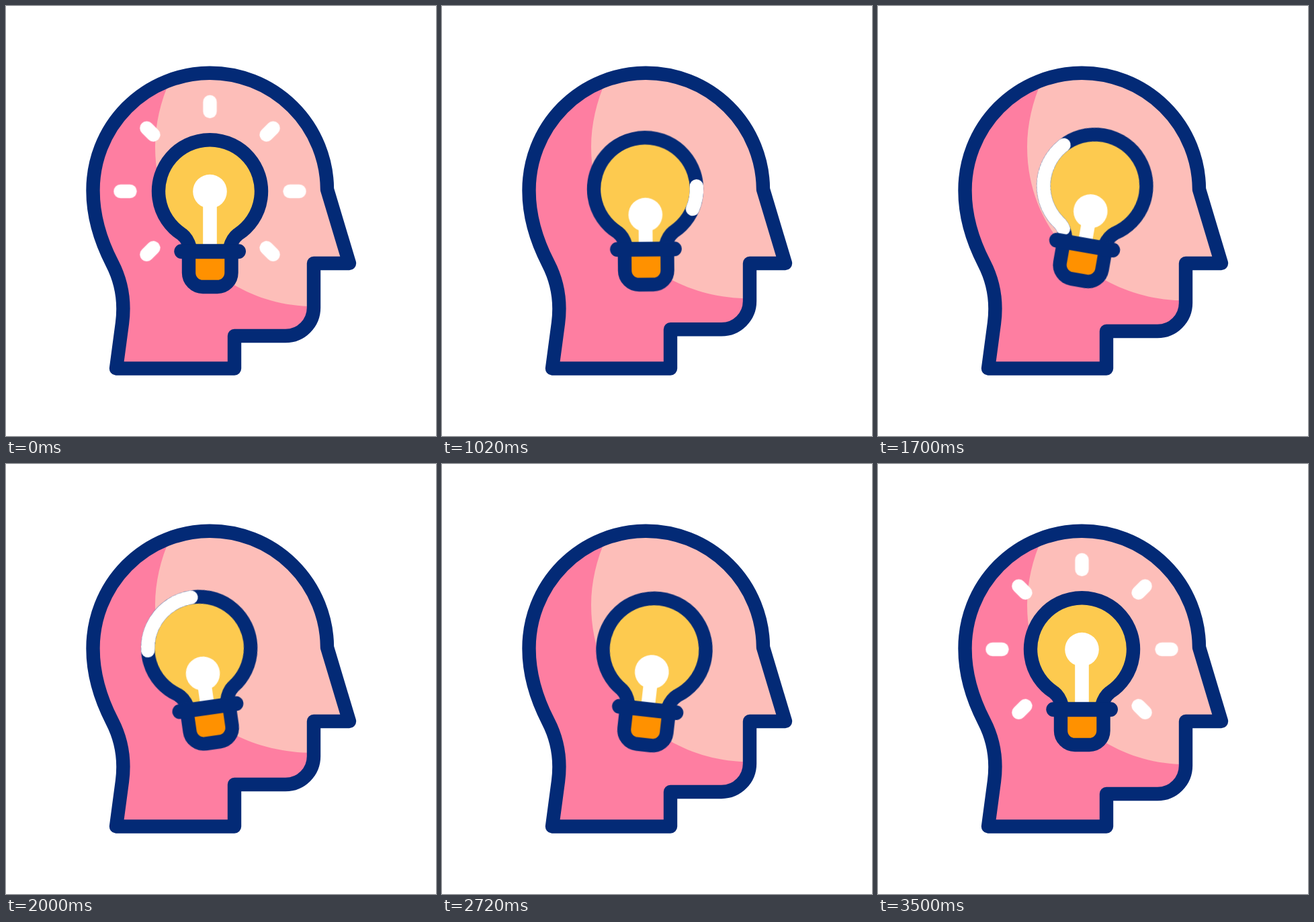
An HTML page without scripts that plays this animation: 640 by 640 pixels, repeating every 3.6 s.

```html
<!DOCTYPE html>
<html lang="en">
<head>
<meta charset="utf-8">
<title>Idea</title>
<style>
  html, body { margin: 0; width: 100%; height: 100%; overflow: hidden; background: #fff; }
  svg { display: block; width: 100vw; height: 100vh; }

  .line { fill: none; stroke: #032a76; stroke-width: 20.4; stroke-linecap: round; stroke-linejoin: round; }
  .white { stroke: #fff; }

  .skin, .light, .lift, .tilt, .filament, .shine, .rays line {
    animation: 3600ms cubic-bezier(.333, 0, .667, 1) infinite;
  }
  .skin { fill: #fe7ea1; animation-name: jaw; }
  .light { fill: #fdbeb9; animation-name: cheek; }
  .lift { animation-name: lift; }
  .tilt { animation-name: tilt; transform-origin: 303.5px 388px; }
  .filament { animation-name: filament; }
  .shine { animation-name: shine; }
  .rays line { animation-name: ray; }

  @keyframes jaw {
    0%, 5.556%, 38.889%, 72.222%, 94.444%, 100% {
      d: path("M164 539.5 H340 V491 H416 A42 42 0 0 0 458 449 V383 H511 L478 273 A174 174 0 0 0 129.5 275 C129.5 312 140 348 158 383 C172 410 177 441 173 472 Z");
    }
    22.222%, 55.556%, 83.333% {
      d: path("M164 539.5 H340 V477 H416 A42 42 0 0 0 458 435 V383 H511 L478 273 A174 174 0 0 0 129.5 275 C129.5 312 140 348 158 383 C172 410 177 441 173 472 Z");
    }
  }
  @keyframes cheek {
    0%, 5.556%, 38.889%, 72.222%, 94.444%, 100% {
      d: path("M244 111 C230 142 222 176 222 210 C222 340.6 327.4 447 458 447 V383 H511 L478 273 A174 174 0 0 0 244 111 Z");
    }
    22.222%, 55.556%, 83.333% {
      d: path("M244 111 C230 142 222 176 222 210 C222 340.6 327.4 430 458 430 V383 H511 L478 273 A174 174 0 0 0 244 111 Z");
    }
  }
  @keyframes lift {
    0%, 5.556%, 32.222%, 61.111%, 100% { transform: translateY(0); }
    21.111% { transform: translateY(-12px); }
    45.556% { transform: translateY(-10px); }
  }
  @keyframes tilt {
    0%, 5.556%, 94.444%, 100% { transform: rotate(0deg); }
    16.667% { transform: rotate(-15deg); }
    41.389% { transform: rotate(16.5deg); }
    60.833% { transform: rotate(-13.5deg); }
    83.056% { transform: rotate(13.5deg); }
  }
  @keyframes filament {
    0%, 5.556%, 94.444%, 100% { transform: translateY(0); }
    25%, 70% { transform: translateY(38px); }
  }
  /* sweeps out along the glass and back again */
  @keyframes shine {
    0%, 19.444% { opacity: 0; stroke-dasharray: 0 200; stroke-dashoffset: 0; }
    19.445% { opacity: 1; stroke-dasharray: 0 200; stroke-dashoffset: 0; }
    47.222% { opacity: 1; stroke-dasharray: 32.4 200; stroke-dashoffset: -64.3; }
    75% { opacity: 1; stroke-dasharray: 0 200; stroke-dashoffset: 0; }
    75.001%, 100% { opacity: 0; stroke-dasharray: 0 200; stroke-dashoffset: 0; }
  }
  /* shrinks to the outer end, later grows from the inner end */
  @keyframes ray {
    0%, 5.556% { opacity: 1; stroke-dasharray: 14 100; stroke-dashoffset: 0; }
    16.666% { opacity: 1; stroke-dasharray: .01 100; stroke-dashoffset: -13.99; }
    16.667% { opacity: 0; stroke-dasharray: .01 100; stroke-dashoffset: -13.99; }
    16.668%, 86.111% { opacity: 0; stroke-dasharray: 0 100; stroke-dashoffset: 0; }
    86.112% { opacity: 1; stroke-dasharray: 0 100; stroke-dashoffset: 0; }
    97.222%, 100% { opacity: 1; stroke-dasharray: 14 100; stroke-dashoffset: 0; }
  }
</style>
</head>
<body>
<svg viewBox="0 0 640 640">
  <path class="skin"/>
  <path class="light"/>
  <path class="line skin" style="fill: none"/>

  <g class="line white rays" transform="translate(303.5 275.8)">
    <line y1="-119" y2="-133"/>
    <line y1="-119" y2="-133" transform="rotate(45)"/>
    <line y1="-119" y2="-133" transform="rotate(90)"/>
    <line y1="-119" y2="-133" transform="rotate(135)"/>
    <line y1="-119" y2="-133" transform="rotate(225)"/>
    <line y1="-119" y2="-133" transform="rotate(270)"/>
    <line y1="-119" y2="-133" transform="rotate(315)"/>
  </g>

  <g class="lift">
    <g class="tilt">
      <path fill="#fdca4f" d="M333 360 Q337 346 345 340 A76.5 76.5 0 1 0 262 340 Q270 346 274 360 Z"/>
      <g class="filament" fill="#fff">
        <circle cx="303.5" cy="276" r="25.3"/>
        <rect x="293.2" y="276" width="20.6" height="86"/>
      </g>
      <path class="line" d="M333 360 Q337 346 345 340 A76.5 76.5 0 1 0 262 340 Q270 346 274 360"/>
      <path class="line white shine" pathLength="100" d="M333 360 Q337 346 345 340 A76.5 76.5 0 1 0 262 340 Q270 346 274 360"/>
      <path class="line" style="fill: #ff9100" d="M272 366 V397 A21 21 0 0 0 293 418 H314.5 A21 21 0 0 0 335.5 397 V366"/>
      <path class="line" style="stroke-width: 22" d="M261.3 365.3 H346"/>
    </g>
  </g>
</svg>
</body>
</html>
```
